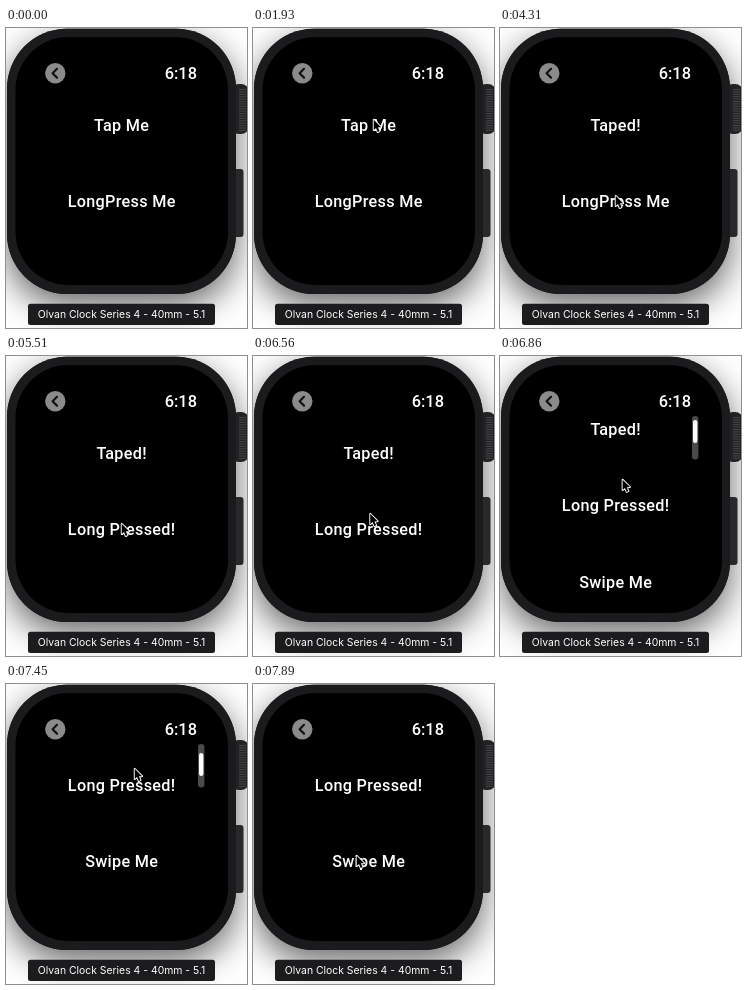
An HTML page with a canvas that plays this animation: 241 by 300 pixels, repeating every 8000 ms.

```html
<!DOCTYPE html>
<html lang="en">
<head>
<meta charset="utf-8">
<title>Watch gestures</title>
<style>
html, body { margin: 0; width: 100%; height: 100%; overflow: hidden; background: #fff; }
canvas { display: block; width: 241px; height: 300px; }
</style>
</head>
<body>
<canvas id="stage"></canvas>
<script>
const W = 241, H = 300, LOOP = 8000, TICK = 147;
const ENTER = 1350, TAP = 2830, PRESS = 5510;
const BAR_ON = 6710, BAR_FADE = 7750, BAR_OFF = 7890;

const canvas = document.getElementById('stage');
const ctx = canvas.getContext('2d');
const dpr = window.devicePixelRatio || 1;
canvas.width = W * dpr;
canvas.height = H * dpr;

// Eased progress from start to end, advancing once per tick.
function progress(t, start, end, power, lead = 1.5) {
  const steps = Math.round((end - start) / TICK);
  const k = Math.floor((t - start + 6) / (end - start) * steps);
  const u = Math.min(Math.max(k / steps, 0), 1);
  return 1 - (1 - u ** lead) ** power;
}

function pointerAt(t) {
  const enter = progress(t, ENTER, 1930, 4);
  const down = progress(t, 3585, 4310, 4);
  const drag = progress(t, 6413, 7450, 2.3);
  const back = progress(t, 7450, 7890, 3);
  return {
    x: 242 - 122 * enter - 5 * down + 13 * drag - 25 * back,
    y: 116 - 25 * enter - 136 * enter * (1 - enter) + 76 * down - 83 * drag + 87 * back
  };
}

function scrollAt(t) {
  return 23.5 * progress(t, 6560, 6860, 2.5, 1) + 48.5 * progress(t, 6860, 7450, 2.3, 1);
}

function box(x, y, w, h, r, fill) {
  ctx.fillStyle = fill;
  ctx.beginPath();
  ctx.roundRect(x, y, w, h, r);
  ctx.fill();
}

function label(text, x, y, font, spacing = 0) {
  ctx.font = font;
  ctx.letterSpacing = spacing + 'px';
  ctx.textAlign = 'center';
  ctx.fillStyle = '#fff';
  ctx.fillText(text, x + spacing / 2, y);
}

function drawWatch() {
  ctx.fillStyle = '#fff';
  ctx.fillRect(0, 0, W, H);

  ctx.save();
  ctx.shadowColor = 'rgba(0,0,0,0.6)';
  ctx.shadowBlur = 34 * dpr;
  ctx.shadowOffsetY = 12 * dpr;
  box(1, 0.7, 229, 265.3, 60, '#1b1b1d');
  ctx.restore();

  // crown
  box(225, 56, 18, 50, 8, '#222224');
  ctx.fillStyle = '#444446';
  for (let y = 61; y < 102; y += 2.4) ctx.fillRect(233, y, 7, 1.1);

  // side button
  box(225, 141, 12.5, 68, 3, '#29292b');

  box(1, 0.7, 229, 265.3, 60, '#1b1b1d');
  box(9.5, 9, 212.5, 248, 53, '#000');
}

function drawHeader() {
  ctx.fillStyle = '#8b8b8b';
  ctx.beginPath();
  ctx.arc(49.3, 45.2, 10.2, 0, Math.PI * 2);
  ctx.fill();
  ctx.strokeStyle = '#111';
  ctx.lineWidth = 2.2;
  ctx.lineCap = ctx.lineJoin = 'round';
  ctx.beginPath();
  ctx.moveTo(51, 40.8);
  ctx.lineTo(46.6, 45.2);
  ctx.lineTo(51, 49.6);
  ctx.stroke();
  label('6:18', 174.8, 50.8, '500 16.4px Roboto, sans-serif');
}

function drawList(t) {
  const shift = scrollAt(t);
  const rows = [
    t < TAP ? 'Tap Me' : 'Taped!',
    t < PRESS ? 'LongPress Me' : 'Long Pressed!',
    'Swipe Me'
  ];
  ctx.save();
  ctx.beginPath();
  ctx.rect(9, 60, 212, 180);
  ctx.clip();
  rows.forEach((text, i) => {
    label(text, 115.5, 102.5 + i * 76.4 - shift, '450 16.2px Roboto, sans-serif', 0.3);
  });
  ctx.restore();

  if (t < BAR_ON || t >= BAR_OFF) return;
  ctx.save();
  ctx.globalAlpha = t < BAR_FADE ? 1 : 0.4;
  box(192, 60, 6.4, 43.5, 3.2, '#4a4a4a');
  box(193, 61.5 + shift * 0.105, 4.4, 23, 2.2, '#fff');
  ctx.restore();
}

function drawPointer(t) {
  if (t < ENTER) return;
  const { x, y } = pointerAt(t);
  ctx.save();
  ctx.translate(x + 0.7, y + 0.8);
  ctx.scale(0.86, 0.86);
  ctx.beginPath();
  [[0, 0], [0, 12], [2.7, 9.6], [4.7, 14.2], [6.8, 13.3], [4.9, 8.8], [8.6, 8.6]]
    .forEach(p => ctx.lineTo(...p));
  ctx.closePath();
  ctx.lineWidth = 2.2;
  ctx.lineJoin = 'round';
  ctx.strokeStyle = '#fff';
  ctx.stroke();
  ctx.fillStyle = '#000';
  ctx.fill();
  ctx.restore();
}

function drawCaption() {
  box(22, 275.7, 187, 21.3, 2.5, '#1c1b1d');
  label('Olvan Clock Series 4 - 40mm - 5.1', 115.5, 290.3, '400 10.4px Inter, sans-serif');
}

const start = performance.now();
function frame() {
  const t = (performance.now() - start) % LOOP;
  ctx.setTransform(dpr, 0, 0, dpr, 0, 0);
  drawWatch();
  drawHeader();
  drawList(t);
  drawCaption();
  drawPointer(t);
  requestAnimationFrame(frame);
}
frame();
</script>
</body>
</html>
```
